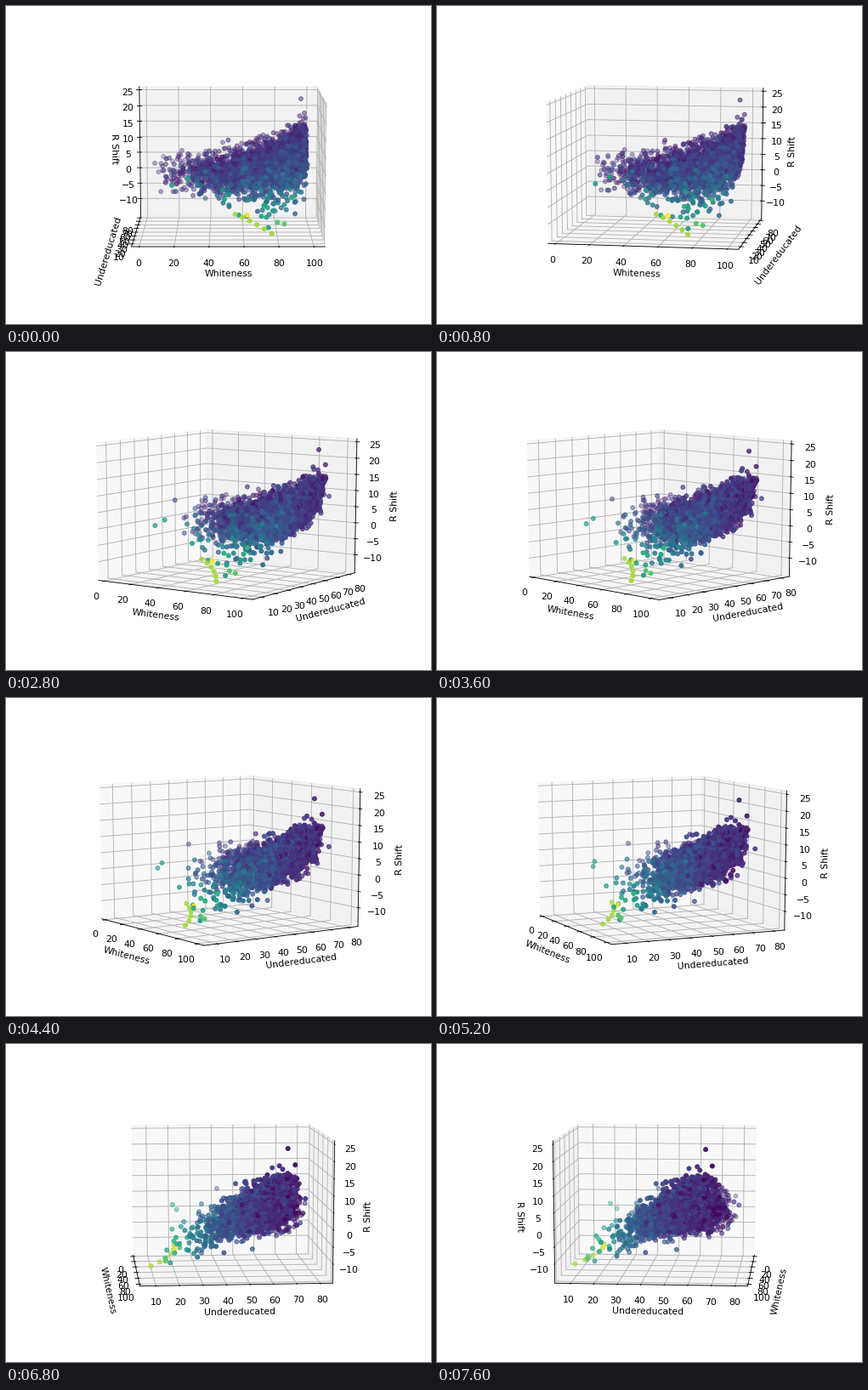
A matplotlib script for the animation above (8000 ms loop, 500 by 374 pixels).

```python
import numpy as np
import matplotlib.pyplot as plt
from matplotlib.animation import FuncAnimation

DPI = 78.125
FRAMES, INTERVAL = 20, 400
ELEVATION, START_AZIMUTH, STEP = 10, -90.01, 5


def make_cloud(count=3100, seed=4):
    """Correlated cloud: z rises with y, and bends upward at high x."""
    rng = np.random.default_rng(seed)
    x = 98 - 95 * rng.beta(0.85, 2.5, count)
    share = x / 98
    tail = rng.gamma(2.6, 6, count) * (1 - 0.45 * share ** 10)
    y = 67 + 14 * (1 - share) - tail + rng.normal(0, 3.5, count)
    d = y - 53
    z = (0.5 + 7.5 * share ** 4 + share ** 1.5 * (0.3 * d - 0.005 * d ** 2)
         + rng.normal(0, 3, count))
    c = 0.03 + 0.75 * np.exp((12 - y) / 24) + rng.normal(0, 0.05, count)
    keep = (y > 14) & (y < 80) & (z > -12) & (z < 19)
    return np.array([x, y, z, np.clip(c, 0.02, 0.85)])[:, keep]


def make_low_arc(count=6):
    """Bright points below the cloud."""
    t = np.linspace(0, 1, count)
    return np.array([55 + 21 * t, 20 - 11 * t ** 2, -8 - 4.5 * t,
                     np.full(count, 0.86)])


peak = [[95.3], [66.7], [23.3], [0.09]]
brightest = [[62], [20.5], [-8.3], [1]]
x, y, z, c = np.hstack([make_cloud(), make_low_arc(), peak, brightest])

fig = plt.figure(figsize=(500 / DPI, 374 / DPI), dpi=DPI, facecolor="white")
ax = fig.add_subplot(projection="3d")
# Let the unit cube stretch with the subplot instead of staying square.
ax.apply_aspect = lambda position=None: None
ax.set_box_aspect((1, 1, 1), zoom=0.94676)
ax.scatter(x, y, z, c=c, s=20, cmap="viridis", vmin=0, vmax=1)
ax.set(xlim=(-4.4, 106.4), ylim=(3.3, 85.3), zlim=(-15.75, 25.95),
       xticks=range(0, 101, 20), yticks=range(10, 81, 10),
       zticks=range(-10, 26, 5),
       xlabel="Whiteness", ylabel="Undereducated", zlabel="R Shift")


def update(frame):
    ax.view_init(elev=ELEVATION, azim=START_AZIMUTH + STEP * frame)
    return ()


anim = FuncAnimation(fig, update, frames=FRAMES, interval=INTERVAL,
                     repeat=True, repeat_delay=0, blit=False)
plt.show()
```
